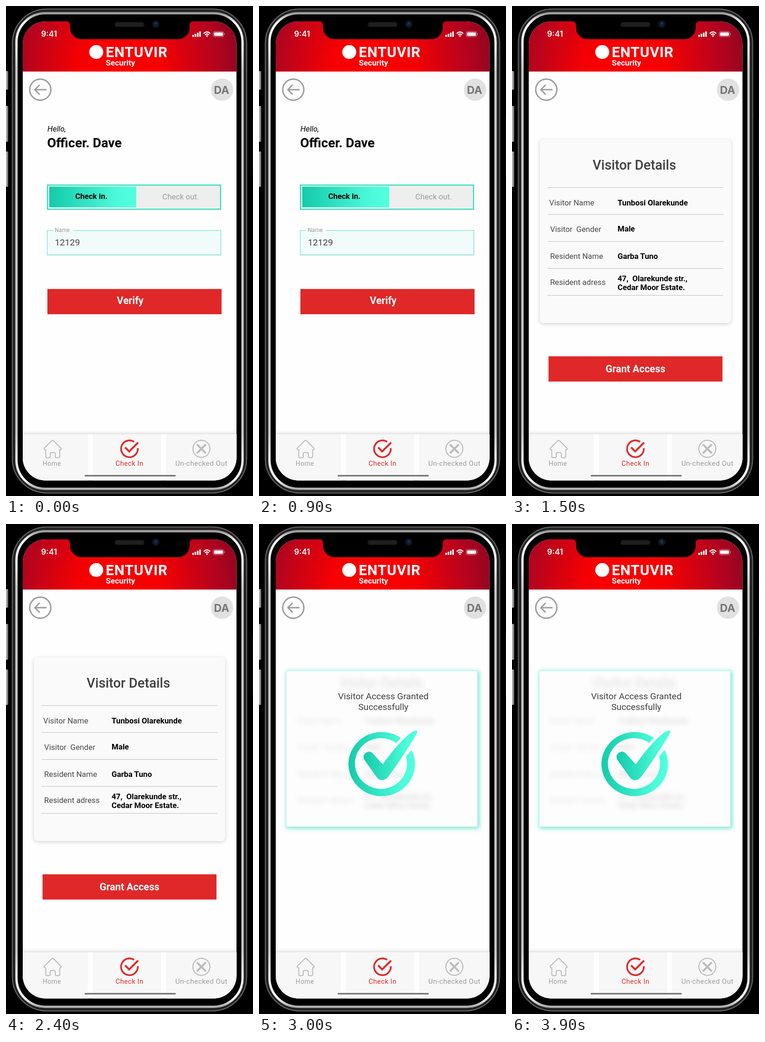
These frames come from a looping animation (531x1054 px, 4.5 s). An HTML page:

```html
<!DOCTYPE html>
<html lang="en">
<head>
<meta charset="utf-8">
<title>Visitor check-in</title>
<style>
  html, body { margin: 0; width: 100%; height: 100%; overflow: hidden; background: #000; }
  svg { display: block; width: 100%; height: 100%; }
  text { font-family: Roboto, sans-serif; white-space: pre; }
  .inter { font-family: Inter, sans-serif; }
  .bold { font-weight: 700; }
  .mid { text-anchor: middle; }
  .line { fill: none; stroke-linecap: round; stroke-linejoin: round; }
</style>
</head>
<body>
<svg viewBox="0 0 531 1054" xmlns="http://www.w3.org/2000/svg">
  <defs>
    <linearGradient id="metal" x1="0" y1="0" x2="0" y2="1">
      <stop offset="0" stop-color="#9a9a9a"/>
      <stop offset=".02" stop-color="#fff"/>
      <stop offset=".06" stop-color="#eee"/>
      <stop offset=".12" stop-color="#c4c4c4"/>
      <stop offset=".88" stop-color="#c4c4c4"/>
      <stop offset=".95" stop-color="#eee"/>
      <stop offset=".98" stop-color="#fff"/>
      <stop offset="1" stop-color="#aaa"/>
    </linearGradient>
    <linearGradient id="key">
      <stop offset="0" stop-color="#8c8c8c"/>
      <stop offset=".6" stop-color="#b8b8b8"/>
      <stop offset="1" stop-color="#444"/>
    </linearGradient>
    <radialGradient id="head" gradientUnits="userSpaceOnUse" cx="245" cy="130" r="250">
      <stop offset="0" stop-color="#fb0000"/>
      <stop offset=".36" stop-color="#f40003"/>
      <stop offset=".85" stop-color="#b00420"/>
      <stop offset="1" stop-color="#980520"/>
    </radialGradient>
    <linearGradient id="mint">
      <stop offset="0" stop-color="#14cbaa"/>
      <stop offset=".8" stop-color="#4dfbda"/>
      <stop offset="1" stop-color="#50ffde"/>
    </linearGradient>
    <filter id="soft" x="-10%" y="-10%" width="120%" height="120%"><feGaussianBlur stdDeviation="4"/></filter>
    <filter id="fog" x="-10%" y="-10%" width="120%" height="120%"><feGaussianBlur stdDeviation="6"/></filter>
    <clipPath id="screen"><rect x="36" y="33" width="459.5" height="987.5" rx="49"/></clipPath>
    <clipPath id="popup"><rect x="59" y="316.5" width="410.5" height="334.5" rx="3"/></clipPath>
    <g id="details">
      <text class="mid" x="263" y="351.5" font-size="28.7" font-weight="500" fill="#404040">Visitor Details</text>
      <g font-size="16.75" fill="#484848">
        <text x="80" y="429">Visitor Name</text>
        <text x="82" y="486">Visitor  Gender</text>
        <text x="82" y="544">Resident Name</text>
        <text x="82" y="600">Resident adress</text>
      </g>
      <g class="bold" font-size="16.75" fill="#000">
        <text x="227" y="429">Tunbosi Olarekunde</text>
        <text x="227" y="484.5">Male</text>
        <text x="227" y="543.5">Garba Tuno</text>
        <text x="227" y="592">47,  Olarekunde str.,</text>
        <text x="227" y="611">Cedar Moor Estate.</text>
      </g>
    </g>
  </defs>

  <rect width="531" height="1054" fill="#000"/>

  <!-- phone body -->
  <g fill="url(#key)">
    <rect x="-4" y="140" width="9" height="40" rx="2"/>
    <rect x="-4" y="215" width="9" height="77" rx="2"/>
    <rect x="-4" y="313" width="9" height="76" rx="2"/>
  </g>
  <rect x="529" y="240" width="4" height="124" fill="#0c0c0c"/>
  <rect x="13.5" y="6.5" width="504" height="1041" rx="74" fill="#242424" stroke="#686868" stroke-width="2"/>
  <rect x="22.5" y="15.5" width="486" height="1023" rx="62" fill="#000" stroke="url(#metal)" stroke-width="5"/>

  <!-- shared screen -->
  <g clip-path="url(#screen)">
    <rect x="36" y="33" width="460" height="988" fill="#fefefe"/>
    <rect x="36" y="33" width="460" height="108" fill="url(#head)"/>
    <path d="M130 32V33A7.500 7.500 0 0 1 137.700 40.500V46.800A24.500 24.500 0 0 0 162.200 71.300H370.300A24.500 24.500 0 0 0 394.800 46.800V40.500A7.500 7.500 0 0 1 402.300 33V32Z" fill="#000"/>
  </g>
  <rect x="233.5" y="34.5" width="64" height="10.5" rx="5.2" fill="#1b1b1d"/>
  <path d="M238 38H293M238 41.5H293" stroke="#262628" stroke-width="1"/>
  <circle cx="322" cy="39" r="8" fill="#10141f"/>
  <circle cx="322" cy="39" r="4.2" fill="#14233d"/>
  <circle cx="322" cy="37" r="1.2" fill="#30557c"/>

  <g fill="#fff">
    <text class="inter" x="75.5" y="66" font-size="17" font-weight="600">9:41</text>
    <rect x="400.5" y="62" width="3.4" height="4.5" rx="1"/>
    <rect x="405.5" y="59.7" width="3.4" height="6.8" rx="1"/>
    <rect x="410.5" y="57.2" width="3.4" height="9.3" rx="1"/>
    <rect x="415.5" y="54.7" width="3.4" height="11.8" rx="1"/>
    <g class="line" stroke="#fff" stroke-width="2.3" style="stroke-linecap:butt">
      <path d="M425 59.2Q432 52.4 439 59.2"/>
      <path d="M427.7 62.2Q432 58.2 436.3 62.2"/>
    </g>
    <path d="M429.6 64.2Q432 62.4 434.4 64.2L432 66.7Z"/>
    <rect x="445.5" y="54.9" width="22.5" height="11.2" rx="3.2" fill="none" stroke="#fff" stroke-opacity=".6"/>
    <rect x="447.3" y="56.7" width="19" height="7.6" rx="1.8"/>
    <path d="M469.4 58.6Q471.6 60.5 469.4 62.4Z" opacity=".7"/>
    <circle cx="194" cy="99" r="15"/>
    <text class="bold" x="214.5" y="110" font-size="31" letter-spacing=".8">ENTUVIR</text>
    <text class="bold" x="214.5" y="128" font-size="17">Security</text>
  </g>

  <g class="line" stroke="#9c9c9c" stroke-width="3">
    <circle cx="73.7" cy="180" r="22.7"/>
    <path d="M62.5 180H86M71.5 170.5L62 180L71.5 189.5"/>
  </g>
  <circle cx="464.5" cy="180" r="24" fill="#e1e1e1"/>
  <text class="inter bold mid" x="463.5" y="189.3" font-size="23" fill="#757575">DA</text>

  <!-- tab bar -->
  <g clip-path="url(#screen)">
    <rect x="30" y="920" width="472" height="110" fill="#000" opacity=".18" filter="url(#soft)"/>
    <rect x="36" y="921" width="460" height="100" fill="#fefefe"/>
    <path d="M36 921H176V1021H36ZM187 921H333.5V1021H187ZM344 921H496V1021H344Z" fill="#f7f7f7"/>
  </g>
  <path class="line" stroke="#b9b9b9" stroke-width="1.9"
    d="M82 951.5L98.5 935Q100.2 933.6 102 935L118.5 951.5Q119.5 954.5 115.5 954.5V969Q115.500 971.5 113 971.5H108Q106 971.5 106 969V964Q106 960.5 102.5 960.5H98Q95 960.5 95 964V969Q95 971.5 92.5 971.5H87.5Q85.5 971.5 85.5 969V954.5Q81 954.5 82 951.5Z"/>
  <g class="line" stroke="#e02828" stroke-width="3.6" style="stroke-linecap:butt;stroke-linejoin:miter">
    <path d="M275.500 937.600A18 18 0 1 0 283.300 951"/>
    <path d="M256 949.300L264.800 958.200L284 939" stroke-width="4"/>
  </g>
  <g class="line" stroke="#bcbcbc">
    <circle cx="420" cy="952.5" r="18.3" stroke-width="2.2"/>
    <path d="M411.5 944L428.5 961M428.5 944L411.5 961" stroke-width="4"/>
  </g>
  <g class="mid" fill="#9c9c9c" letter-spacing=".5">
    <text x="98.7" y="989" font-size="14">Home</text>
    <text x="265.5" y="989" font-size="14.6" fill="#e02828">Check In</text>
    <text x="420" y="989" font-size="15">Un-checked Out</text>
  </g>
  <rect x="169" y="1008.7" width="196" height="3.3" rx="1.6" fill="#747474"/>

  <!-- scene: code entry -->
  <g class="scene">
    <text x="89" y="269.5" font-size="16.5" font-style="italic">Hello,</text>
    <text class="bold" x="88.5" y="304" font-size="28">Officer. Dave</text>
    <rect x="89.2" y="385.2" width="372" height="52" fill="#eee" stroke="#2fdcba" stroke-width="2.3"/>
    <rect x="91" y="387" width="189" height="48.5" fill="#e9f8f5"/>
    <rect x="93" y="388.5" width="187" height="44.5" fill="url(#mint)"/>
    <text class="bold mid" x="183.5" y="415" font-size="16.5">Check in.</text>
    <text class="mid" x="375.5" y="416" font-size="16.7" fill="#9b9b9b">Check out.</text>
    <rect x="89" y="485" width="374" height="53" fill="#000" opacity=".05"/>
    <rect x="88.7" y="482.7" width="373" height="52.6" fill="#f1fbfa" stroke="#72e6d2" stroke-width="1.3"/>
    <rect x="101" y="480" width="43" height="4" fill="#fbfefe"/>
    <text x="105" y="485.5" font-size="12" fill="#999">Name</text>
    <text x="105" y="514.5" font-size="19.2" fill="#444">12129</text>
    <rect x="89" y="608.7" width="374.5" height="54.3" fill="#e02828"/>
    <text class="bold mid" x="267" y="641" font-size="21.5" fill="#fff">Verify</text>
  </g>

  <!-- scene: visitor details -->
  <g class="scene">
    <rect x="60" y="289" width="411" height="395" rx="8" fill="#000" opacity=".18" filter="url(#soft)"/>
    <rect x="60" y="287" width="411" height="395" rx="8" fill="#fafafa"/>
    <path d="M76 390.5H454M77 448.5H455M77 506.5H455M76 564.5H454M76 622.5H454" stroke="#bdbdbd"/>
    <use href="#details"/>
    <rect x="78.5" y="753.5" width="374" height="54.3" fill="#e02828"/>
    <text class="bold mid" x="265.5" y="788" font-size="21.4" fill="#fff">Grant Access</text>
  </g>

  <!-- scene: access granted -->
  <g class="scene">
    <rect x="58" y="315.5" width="416" height="340" rx="4" fill="#2fdcba" opacity=".58" filter="url(#soft)"/>
    <rect x="59" y="316.5" width="410.5" height="334.5" rx="3" fill="#fdfdfd"/>
    <g clip-path="url(#popup)">
      <use href="#details" filter="url(#fog)" opacity=".14"/>
    </g>
    <g class="mid" font-size="19.2" fill="#404040">
      <text x="267.3" y="376.5">Visitor Access Granted</text>
      <text x="267.3" y="399.5">Successfully</text>
    </g>
    <g fill="url(#mint)">
      <path d="M305 460A71.5 69 0 1 0 328 486L316 500A56 54.5 0 1 1 295 471Z"/>
      <path d="M227 508Q221 498 230 492Q238 486 245 494L266 517Q299 470 329 447Q334 444 340 444.5Q341 447 338 453Q308 503 279 542Q273 551 264.5 551Q257 551 252 543Z"/>
    </g>
  </g>
</svg>
<script>
  const HOLD = 1500;
  const scenes = [...document.querySelectorAll('.scene')];
  const start = performance.now();

  function draw(ms) {
    const active = Math.floor(ms / HOLD) % scenes.length;
    scenes.forEach((s, i) => s.setAttribute('display', i === active ? 'inline' : 'none'));
  }

  function tick() {
    draw(performance.now() - start);
    requestAnimationFrame(tick);
  }
  tick();
</script>
</body>
</html>
```
